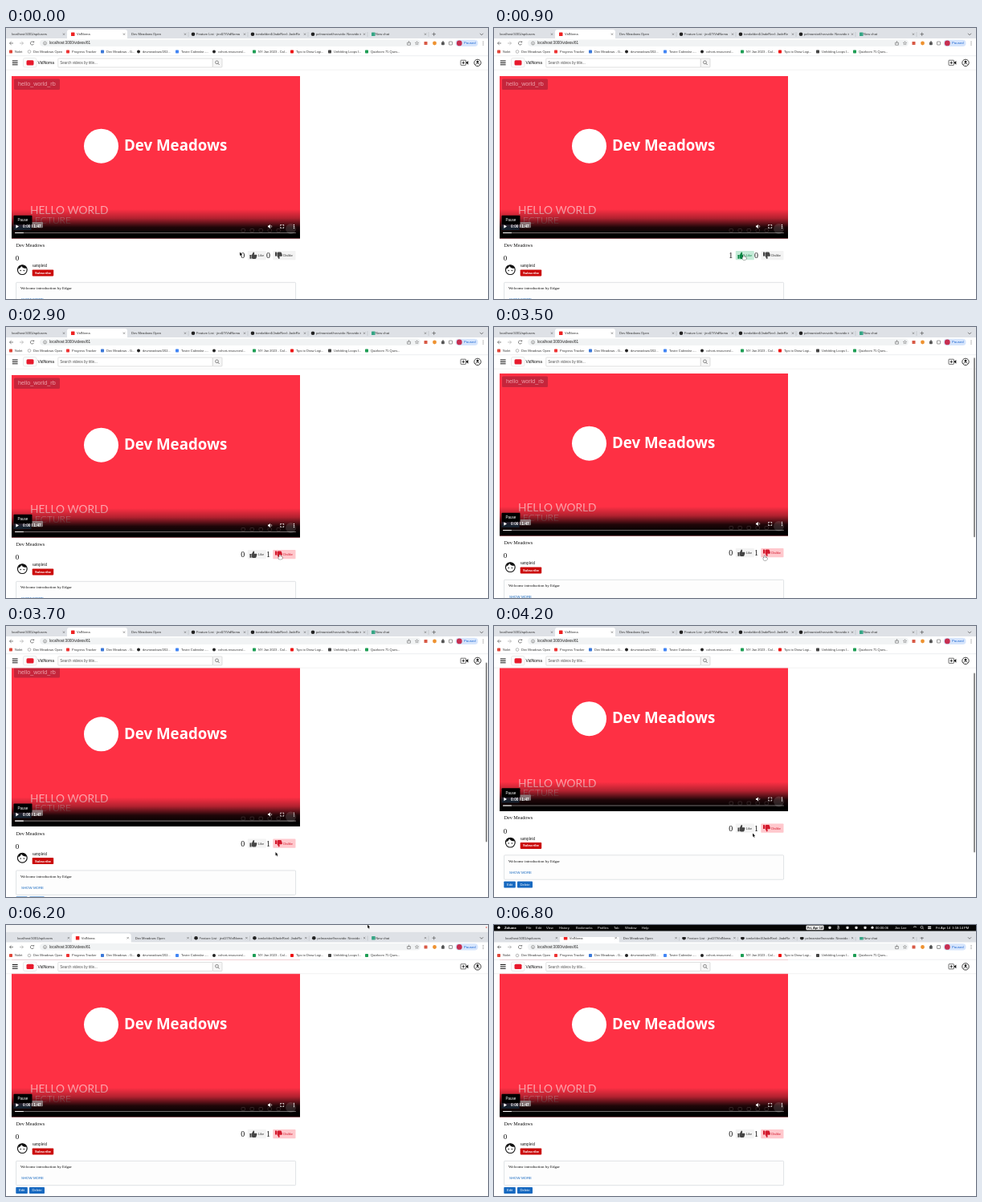
These frames come from a looping animation (600x338 px, 6900 ms). An HTML page with a canvas:

```html
<!DOCTYPE html>
<html lang="en">
<head>
<meta charset="utf-8">
<title>Video page</title>
<style>
html, body { margin: 0; width: 100%; height: 100%; overflow: hidden; background: #fff; }
canvas { display: block; width: 600px; height: 338px; }
</style>
</head>
<body>
<canvas id="stage"></canvas>
<script>
const LOOP = 6900, STEP = 100, W = 600, H = 338;
const SANS = '"Liberation Sans", Arial, sans-serif';
const SERIF = '"Liberation Serif", "Times New Roman", serif';
const LATO = 'Lato, sans-serif';
const OPEN = '"Open Sans", sans-serif';

const canvas = document.getElementById('stage');
const c = canvas.getContext('2d');
const dpr = window.devicePixelRatio || 1;
canvas.width = W * dpr;
canvas.height = H * dpr;

const clamp = v => Math.max(0, Math.min(1, v));
const ease = v => v * v * (3 - 2 * v);
const ramp = (t, a, b) => ease(clamp((t - a) / (b - a)));

function rect(x, y, w, h, fill, r = 0, line) {
  c.beginPath();
  c.roundRect(x, y, w, h, r);
  if (fill) { c.fillStyle = fill; c.fill(); }
  if (line) { c.strokeStyle = line; c.lineWidth = 0.6; c.stroke(); }
}
function disc(x, y, r, fill) {
  c.beginPath();
  c.arc(x, y, r, 0, 7);
  c.fillStyle = fill;
  c.fill();
}
function ring(x, y, r, color, w = 0.7, a = 0, b = Math.PI * 2) {
  c.beginPath();
  c.arc(x, y, r, a, b);
  c.strokeStyle = color;
  c.lineWidth = w;
  c.stroke();
}
function line(pts, color, w = 0.7) {
  c.beginPath();
  for (let i = 0; i < pts.length; i += 2) c.lineTo(pts[i], pts[i + 1]);
  c.strokeStyle = color;
  c.lineWidth = w;
  c.stroke();
}
function poly(pts, fill) {
  c.beginPath();
  for (let i = 0; i < pts.length; i += 2) c.lineTo(pts[i], pts[i + 1]);
  c.closePath();
  c.fillStyle = fill;
  c.fill();
}
// y is the vertical middle of the letters
function text(s, x, y, size, color = '#222', font = SANS, style = '', align = 'left') {
  c.font = `${style} ${size}px ${font}`;
  c.fillStyle = color;
  c.textAlign = align;
  c.textBaseline = 'alphabetic';
  c.fillText(s, x, y + size * 0.34);
}
function dots(x, y, color, r = 0.6) {
  for (const d of [-2, 0, 2]) disc(x, y + d, r, color);
}

// ---- timeline ----
const path = [
  [0, 291, 280], [600, 310, 283], [1200, 312, 285], [1900, 326, 298],
  [2400, 341, 284], [3100, 341, 285], [3500, 337, 286], [3900, 334, 279],
  [4200, 322, 259], [4700, 311, 253], [5100, 312, 253], [5500, 344, 251],
  [5900, 344, 252], [6200, 450, 0], [6400, 450, -9], [6900, 450, -9]
];
function pointer(t) {
  let i = 0;
  while (i < path.length - 2 && t >= path[i + 1][0]) i++;
  const [ta, xa, ya] = path[i], [tb, xb, yb] = path[i + 1];
  const k = ramp(t, ta, tb);
  return { x: xa + (xb - xa) * k, y: ya + (yb - ya) * k };
}
function vote(t) {
  if (t < 800) return '';
  if (t < 2600) return 'like';
  if (t < 4900) return 'dislike';
  return t < 5800 ? 'like' : 'dislike';
}
const scrollAt = t => 2 * ramp(t, 3300, 3500) + 29.5 * ramp(t, 3500, 4000);

// ---- browser frame ----
const tabs = [
  ['localhost:5001/api/users', ''],
  ['VidNoma', '#e22'],
  ['Dev Meadows Open', ''],
  ['Feature List · jirol27/VidNoma', '#222'],
  ['tomkelder4/JadeReel: JadeRe', '#222'],
  ['pelmarstorf/neovido: Neovido is', '#222'],
  ['New chat', '#36a585']
];
const marks = [
  [6, 'Nolet', '#e0473a'], [29, 'Dev Meadows Open', ''], [77, 'Progress Tracker', '#e33'],
  [120, 'Dev Meadows - G...', '#3b78d8'], [165, 'devmeadows/202...', '#222'],
  [213, 'Tovire Calendar -...', '#4285f4'], [259, 'cohort-resources/...', '#222'],
  [309, 'NY Jan 2023 - Cal...', '#1e9e55'], [356, 'Tips to Draw Logi...', '#e11'],
  [403, 'Unfolding Loops I...', '#444'], [449, 'Quizloom 75 Ques...', '#1e9e55']
];

function drawTabs(slide) {
  rect(0, 0, W, 13, '#dee1e6');
  const at = x => x + 7 * slide * Math.max(0, 1 - x / 460);
  const edges = [0, 76, 151, 227, 301, 376, 450, 526].map(at);
  tabs.forEach(([name, color], i) => {
    const x = edges[i], end = edges[i + 1];
    if (i === 1) rect(x, 2, end - x, 12, '#fff', [3, 3, 0, 0]);
    else if (i !== 0) line([end, 5, end, 11], '#a5a9ae', 0.4);
    let tx = x + (i === 0 ? 7 : 5);
    if (color) {
      if (i === 1 || i === 6) rect(x + 5, 5.5, 4.5, 4.5, color, 0.6);
      else disc(x + 6, 7.7, 2.3, color);
      tx = x + (i < 3 ? 12 : 10);
    }
    c.save();
    c.beginPath();
    c.rect(tx, 2, end - 8 - tx, 11);
    c.clip();
    text(name, tx, 7.7, 4.1, '#333');
    c.restore();
    const q = end - 4;
    line([q - 1.2, 6.5, q + 1.2, 8.9], '#555', 0.5);
    line([q + 1.2, 6.5, q - 1.2, 8.9], '#555', 0.5);
  });
  line([530.5, 7.7, 535, 7.7], '#444', 0.6);
  line([532.7, 5.5, 532.7, 10], '#444', 0.6);
  line([590, 6.8, 592, 8.8, 594, 6.8], '#444', 0.7);
}

function drawToolbar() {
  rect(0, 13, W, 22, '#fff');
  line([9, 19, 4.5, 19], '#555');
  line([6.6, 17, 4.5, 19, 6.6, 21], '#555');
  line([17, 19, 21.5, 19], '#aaa');
  line([19.4, 17, 21.5, 19, 19.4, 21], '#aaa');
  ring(32.5, 19, 2.1, '#555', 0.7, 0.3, 5.6);
  poly([33.2, 18.1, 35.1, 18.1, 35.1, 16.2], '#555');
  rect(42, 14.6, 474, 8.4, '#f1f3f4', 4.2);
  ring(48.5, 19, 2, '#555', 0.5);
  line([48.5, 18.6, 48.5, 20.2], '#555', 0.5);
  text('localhost:3000/videos/61', 54, 18.9, 4.65, '#222');
  rect(499.5, 18, 4, 3.2, null, 0.3, '#666');
  line([501.5, 19.5, 501.5, 16], '#666', 0.5);
  c.beginPath();
  for (let i = 0; i < 10; i++) {
    const r = i % 2 ? 1 : 2.3, a = i * Math.PI / 5 - Math.PI / 2;
    c.lineTo(511.5 + r * Math.cos(a), 19 + r * Math.sin(a));
  }
  c.closePath();
  c.strokeStyle = '#666';
  c.lineWidth = 0.45;
  c.stroke();
  rect(520.5, 17, 4, 4, '#d85945', 0.5);
  disc(533.5, 19, 2.4, '#ee9230');
  rect(542, 17.4, 3.8, 3.8, '#555', 0.7);
  disc(544, 17.1, 0.9, '#555');
  rect(551.5, 17, 4, 4, null, 0.4, '#555');
  rect(559.5, 14.8, 28, 8.2, '#d6e5fc', 4.1);
  disc(564.3, 18.9, 3.4, '#c72f51');
  text('Paused', 570, 18.9, 4.3, '#1b66d2');
  dots(594, 19, '#555', 0.5);
  for (const [x, name, color] of marks) {
    if (color) rect(x - 2, 27.5, 4, 4, color, color === '#222' ? 2 : 0.7);
    else ring(x, 29.5, 1.8, '#777', 0.5);
    text(name, x + 5, 29.6, 4, '#333');
  }
  line([0, 34.7, W, 34.7], '#dadce0', 0.5);
}

function drawHeader() {
  rect(0, 35, W, 17.3, '#fff');
  for (const y of [41, 43.4, 45.8]) line([7.8, y, 14.6, y], '#111', 1);
  rect(21.5, 37.5, 16.5, 11.5, '#fbfbfb', 2, '#ddd');
  rect(25.5, 40.2, 9, 6.4, '#e8192c', 1.5);
  text('VidNoma', 39.5, 43.4, 5, '#111');
  rect(64.8, 38, 192.5, 11, '#fff', 0.8, '#ccc');
  text('Search videos by title...', 67.3, 43.6, 4.5, '#555');
  rect(257.3, 38, 11.7, 11, '#f6f6f6', 0.8, '#ccc');
  ring(262.5, 42.8, 1.9, '#444', 0.6);
  line([263.9, 44.2, 265.6, 46], '#444', 0.7);
  rect(566, 40.2, 6.5, 6.2, null, 0.6, '#111');
  poly([572.5, 43.3, 575.3, 40.9, 575.3, 45.8], '#111');
  line([567.6, 43.3, 571, 43.3], '#111', 0.8);
  line([569.3, 41.6, 569.3, 45], '#111', 0.8);
  ring(587, 43.4, 4.2, '#111', 0.8);
  disc(587, 42.2, 1.4, '#111');
  ring(587, 47, 2.9, '#111', 0.8, 3.7, 5.72);
  line([0, 52.2, W, 52.2], '#e4e4e4', 0.5);
}

// ---- page ----
function drawVideo() {
  rect(7, 60, 359, 202.5, '#fe3044');
  rect(10, 63.5, 57, 13.5, 'rgba(110,20,45,.4)', 1.5);
  text('hello_world_rb', 15, 70, 7.2, 'rgba(255,215,220,.7)');
  disc(118.5, 147.2, 21.5, '#fff');
  text('Dev Meadows', 147, 146.6, 18.7, '#fff', OPEN, 'bold');
  text('HELLO WORLD', 30, 227.5, 13.7, 'rgba(255,235,238,.62)', LATO);
  text('LECTURE', 30, 239.8, 12, 'rgba(255,235,238,.62)', LATO, '300');
  const g = c.createLinearGradient(0, 226, 0, 258);
  g.addColorStop(0, 'rgba(0,0,0,0)');
  g.addColorStop(0.35, 'rgba(0,0,0,.3)');
  g.addColorStop(0.7, 'rgba(0,0,0,.88)');
  g.addColorStop(1, '#000');
  rect(7, 226, 359, 36.5, g);
  for (const x of [295, 306, 317, 328, 339]) rect(x - 2, 250.5, 4.5, 4, null, 1, 'rgba(255,255,255,.2)');
  disc(354.5, 250.5, 6.5, 'rgba(255,255,255,.13)');
  rect(9.5, 243, 22, 9, 'rgba(20,70,95,.45)');
  rect(32, 242, 14, 7.2, 'rgba(165,165,165,.65)', 1);
  poly([12.3, 245.2, 12.3, 249.8, 16, 247.5], '#fff');
  text('0:00 / 1:47', 21, 247.7, 4.7, '#fff', SANS, 'bold');
  rect(9.5, 233.8, 23, 11.4, '#000', 1);
  text('Pause', 14.4, 239.6, 4.5, '#fff');
  poly([326, 246.5, 327.3, 246.5, 329, 244.9, 329, 250.1, 327.3, 248.5, 326, 248.5], '#fff');
  ring(329, 247.5, 1.7, '#fff', 0.6, -1, 1);
  for (const sx of [-1, 1]) for (const sy of [-1, 1]) {
    const x = 343.7 + 2 * sx, y = 247.5 + 2 * sy;
    line([x - 1.4 * sx, y, x, y, x, y - 1.4 * sy], '#fff', 0.8);
  }
  dots(358.5, 247.5, '#fff', 0.65);
  rect(11, 254.9, 350, 1.2, 'rgba(255,255,255,.42)', 0.6);
  rect(11, 254.9, 11, 1.2, '#fff', 0.6);
}

function thumb(x, y, color, down) {
  c.save();
  c.translate(x, y);
  if (down) c.scale(1, -1);
  rect(-4.3, -0.7, 2, 4.8, color, 0.2);
  c.beginPath();
  c.moveTo(-1.8, -0.6);
  c.lineTo(0.1, -4.3);
  c.quadraticCurveTo(1.8, -4.4, 1.3, -2.3);
  c.lineTo(1, -1);
  c.lineTo(3.8, -1);
  c.quadraticCurveTo(5, -0.7, 4.5, 0.8);
  c.lineTo(3.6, 3.5);
  c.quadraticCurveTo(3.3, 4.2, 2.4, 4.2);
  c.lineTo(-0.6, 4.2);
  c.lineTo(-1.8, 3.5);
  c.closePath();
  c.fillStyle = color;
  c.fill();
  c.restore();
}

function voteButton(x, w, label, on, hover, down) {
  const tint = down ? '#ffc8cd' : '#c5ebd8', ink = down ? '#d3182c' : '#078643';
  rect(x, 278, w, 11.2, on ? tint : hover ? '#dadada' : '#f3f3f3', 0.8);
  thumb(x + 7, 283.7, on ? ink : '#444', down);
  text(label, x + 13, 283.7, 4, on ? ink : '#333');
}

function drawFace(x, y) {
  ring(x, y, 5.9, '#111', 1.1);
  c.beginPath();
  c.moveTo(x - 5.4, y - 0.6);
  c.quadraticCurveTo(x - 2, y - 1.8, x - 1.2, y - 4.6);
  c.quadraticCurveTo(x + 1, y - 1.4, x + 5.5, y - 1.8);
  c.lineTo(x + 4, y - 4.6);
  c.quadraticCurveTo(x, y - 7.6, x - 4, y - 4.6);
  c.closePath();
  c.fillStyle = '#111';
  c.fill();
  disc(x - 2.1, y + 0.9, 0.75, '#111');
  disc(x + 2.1, y + 0.9, 0.75, '#111');
}

function blueButton(label, x, w) {
  rect(x, 350, w, 8, '#1769c0', 0.8);
  text(label, x + w / 2, 354, 4.2, '#fff', SANS, '', 'center');
}

function drawInfo(state, hover) {
  const liked = state === 'like', disliked = state === 'dislike';
  text('Dev Meadows', 12.5, 270.8, 6.15, '#111', SERIF);
  text('0', 14, 287.2, 9, '#111', SERIF, '', 'center');
  text(liked ? '1' : '0', 294.7, 283.8, 10, '#111', SERIF, '', 'center');
  voteButton(300.8, 23, 'Like', liked, hover === 'like', false);
  text(disliked ? '1' : '0', 326.4, 283.8, 10, '#111', SERIF, '', 'center');
  voteButton(332.3, 28.2, 'Dislike', disliked, hover === 'dislike', true);
  drawFace(20.3, 301.6);
  text('sampleid', 32.7, 296.4, 5.1, '#111', SERIF);
  rect(32.7, 301.4, 26.5, 8, '#cb0808', 0.8);
  text('Subscribe', 46, 305.5, 4.2, '#fff', SANS, 'bold', 'center');
  rect(12.6, 317.3, 348, 30.4, '#fdfdfd', 1, '#c9ced3');
  text('Welcome introduction by Edgar', 18, 324.7, 5, '#111', SERIF);
  text('SHOW MORE', 19, 338.6, 4.4, '#1769c0');
  blueButton('Edit', 12.3, 14.5);
  blueButton('Delete', 29, 19);
}

// ---- system menu ----
const menu = [[40, 'File'], [52, 'Edit'], [65, 'View'], [81, 'History'], [102, 'Bookmarks'],
  [129, 'Profiles'], [149, 'Tab'], [163, 'Window'], [184, 'Help']];

function drawMenu(k) {
  if (!k) return;
  c.save();
  c.translate(0, -8 * (1 - k));
  rect(0, 7, W, 8, '#dee1e6');
  rect(0, 0, W, 7.6, '#050505');
  disc(6, 3.2, 1.6, '#fff');
  text('Zolume', 13, 3.2, 4.2, '#fff', SANS, 'bold');
  for (const [x, s] of menu) text(s, x, 3.2, 4.1, '#eee');
  rect(388.5, 0.5, 22, 5.8, '#ececec', 1);
  text('Fri, Apr 14', 399.5, 3.3, 3.9, '#111', SANS, 'bold', 'center');
  for (const x of [418, 440, 451, 462]) rect(x - 1.6, 1.7, 3.2, 3.2, '#ddd', 0.8);
  line([428, 1, 430, 4.4, 428, 5.6, 428, 0.8, 430, 2.2, 427, 4.4], '#ddd', 0.5);
  disc(471, 3.2, 1.6, '#eee');
  text('00:00:06', 475, 3.3, 4.1, '#fff');
  text('Jiro Lee', 499, 3.3, 4.1, '#fff');
  ring(524, 4.6, 2.6, '#eee', 0.8, 3.9, 5.5);
  ring(532.5, 2.9, 1.5, '#eee', 0.6);
  line([533.5, 4, 535, 5.3], '#eee', 0.6);
  rect(540, 1.7, 4.2, 1.3, '#eee', 0.6);
  rect(540, 3.7, 4.2, 1.3, '#eee', 0.6);
  text('Fri Apr 14  3:58:14 PM', 550, 3.3, 4.1, '#fff');
  c.restore();
}

function drawCursor(x, y, hand) {
  c.save();
  c.translate(x, y);
  c.beginPath();
  if (hand) {
    c.roundRect(-0.7, -1, 1.4, 4, 0.7);
    c.roundRect(-1.7, 1.4, 4.6, 3.5, 1);
  } else {
    for (const [px, py] of [[0, -0.5], [0, 4], [1, 3.1], [1.8, 4.8], [2.6, 4.4], [1.8, 2.8], [3.2, 2.8]]) c.lineTo(px, py);
    c.closePath();
  }
  c.lineJoin = 'round';
  c.strokeStyle = hand ? '#222' : '#fff';
  c.lineWidth = 0.8;
  c.stroke();
  c.fillStyle = hand ? '#fff' : '#111';
  c.fill();
  c.restore();
}

function draw(t) {
  const scroll = scrollAt(t), p = pointer(t);
  const slide = ramp(t, 6000, 6200), drop = 8.5 * slide;
  const py = p.y + scroll - drop;
  let hover = '';
  if (py > 278 && py < 289.5) {
    if (p.x > 301 && p.x < 324) hover = 'like';
    if (p.x > 332 && p.x < 360.5) hover = 'dislike';
  }
  c.setTransform(dpr, 0, 0, dpr, 0, 0);
  rect(0, 0, W, H, '#fff');
  c.save();
  c.translate(0, drop);
  c.save();
  c.translate(0, -scroll);
  drawVideo();
  drawInfo(vote(t), hover);
  c.restore();
  drawHeader();
  drawToolbar();
  drawTabs(slide);
  const bar = ramp(t, 3200, 3400) * (1 - ramp(t, 4500, 4800));
  if (bar) {
    c.globalAlpha = bar;
    rect(597, 37 + scroll * 0.68, 2, 224, '#8d8d8d', 1);
    c.globalAlpha = 1;
  }
  c.restore();
  if (slide) {
    rect(0, 0, W, drop, '#f3f4f5');
    disc(598, 3, 0.8 * slide, '#e2483d');
  }
  drawMenu(ramp(t, 6200, 6500));
  drawCursor(p.x, p.y, hover !== '');
}

const start = performance.now();
function tick() {
  const t = (performance.now() - start) % LOOP;
  draw(Math.floor(t / STEP) * STEP);
  requestAnimationFrame(tick);
}
tick();
</script>
</body>
</html>
```
